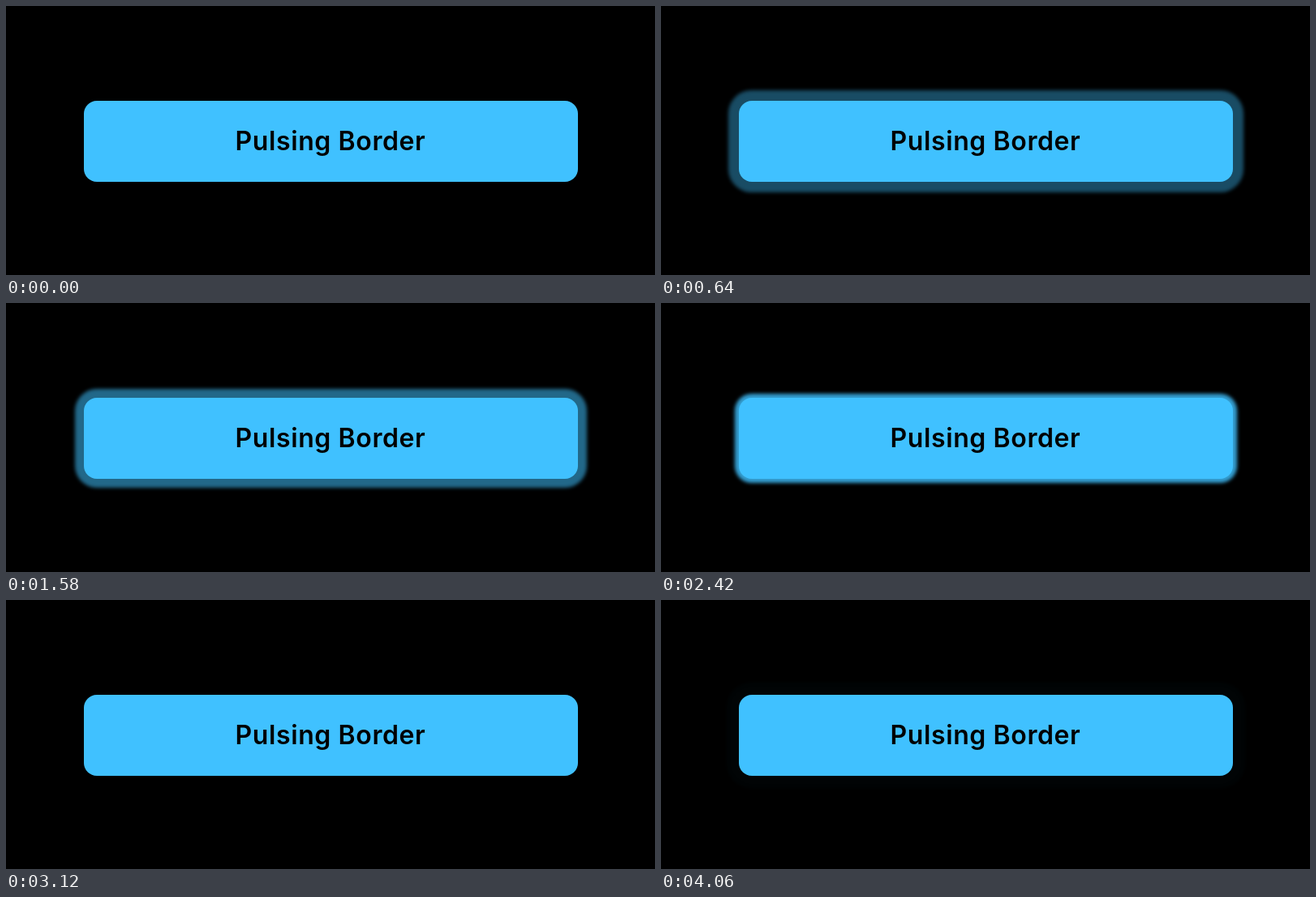
Recreate the animation shown at these times as an HTML page. Size 800 by 332 pixels, loop 4090 ms.

```html
<!DOCTYPE html>
<html lang="en">
<head>
<meta charset="utf-8">
<title>Pulsing Border</title>
<style>
  html, body { margin: 0; width: 100%; height: 100%; overflow: hidden; background: #000; }
  #button {
    position: absolute; left: 95.5px; top: 117px; width: 609px; height: 99.5px;
    border-radius: 16px; background: #40c1ff; color: #000;
    font: 600 32px/99.5px Inter, sans-serif; letter-spacing: .6px; text-align: center;
  }
</style>
</head>
<body>
<div id="button">Pulsing Border</div>
<script>
  const LOOP = 4090, PERIOD = 1030, LEAD = 30, REST = 60, REACH = 15.5;
  const button = document.getElementById('button');
  const start = performance.now();

  function draw(now) {
    const t = Math.max(0, now - start) % LOOP;
    const phase = t < LEAD ? 0 : (t - LEAD) % PERIOD;
    const x = Math.max(0, (phase - REST) / (PERIOD - REST));
    const alpha = (1 + Math.cos(Math.PI * x)) / 2;
    // The ring slows down as it fades.
    const spread = REACH * (1 - alpha * alpha);
    const blur = Math.min(4, spread);
    button.style.boxShadow = `0 0 ${blur}px ${spread}px rgba(64, 193, 255, ${alpha})`;
    requestAnimationFrame(draw);
  }
  draw(start);
</script>
</body>
</html>
```
